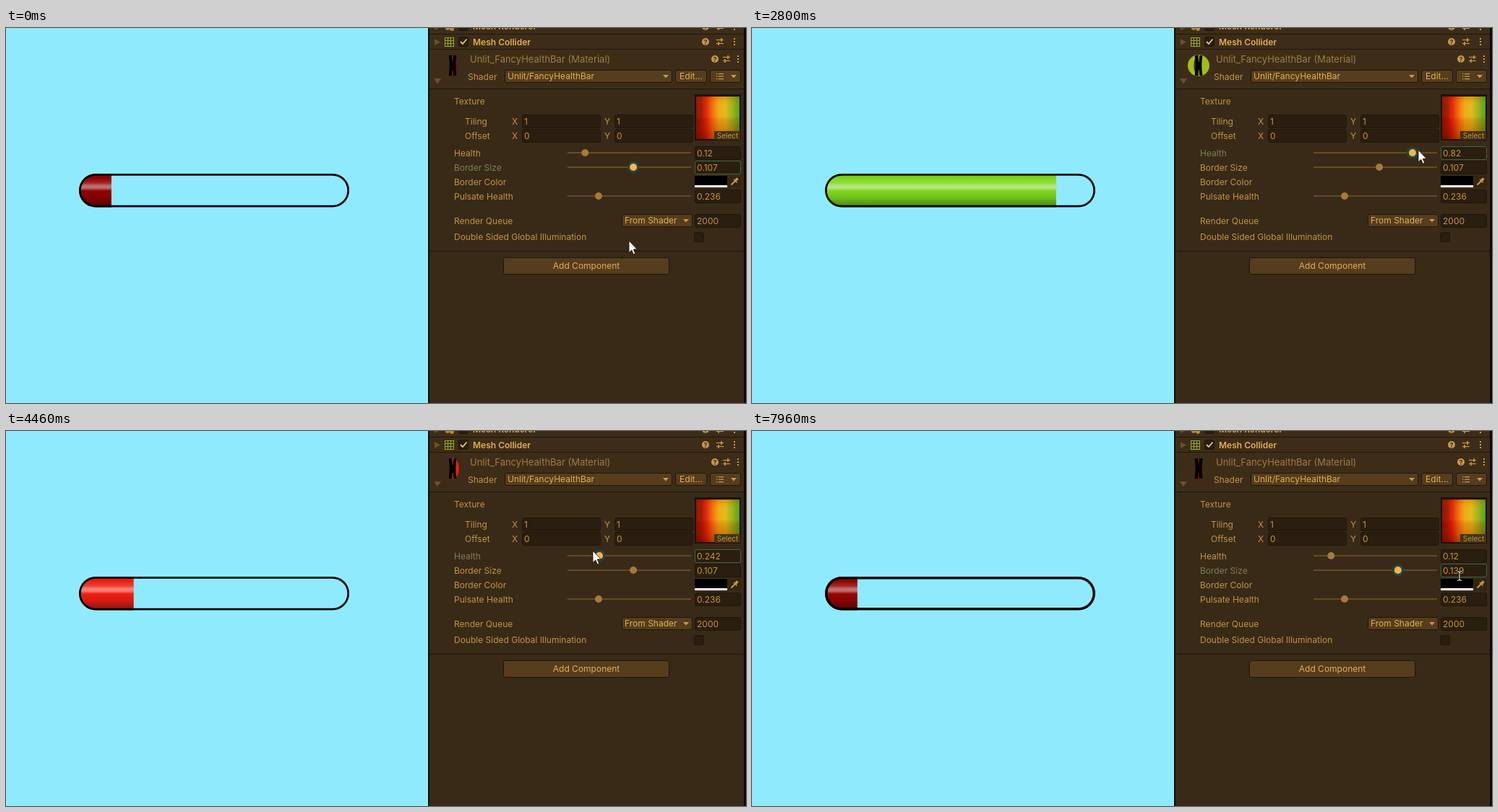
These frames come from a looping animation (1024 px wide and 520 px high, 8 s). An HTML page with a canvas:

```html
<!DOCTYPE html>
<html lang="en">
<head>
<meta charset="utf-8">
<title>Health bar inspector</title>
<style>
html, body { margin: 0; width: 100%; height: 100%; overflow: hidden; background: #90eafe; }
canvas { display: block; }
</style>
</head>
<body>
<canvas id="stage" width="1024" height="520"></canvas>
<script>
const g = document.getElementById('stage').getContext('2d');
const LOOP = 8000, STEP = 70, PAUSE_END = 3480, LAG = 20;
const HEALTH_FOCUS = 1120, BORDER_FOCUS = 5720;
const C = {
  sky: '#90eafe', panel: '#382a17', head: '#3d2d18', line: '#1e160b', field: '#2a1e10',
  button: '#553d1d', text: '#c39346', bright: '#e2ad54', dim: '#a07c40', faint: '#6b4f28', focus: '#7c8152'
};

// Pointer path: time, x, y
const path = [
  [70, 862, 295], [450, 832, 225], [840, 803, 171], [1050, 801.3, 170], [1400, 790, 170],
  [1680, 794, 170], [2240, 858, 171], [2310, 866, 171], [3150, 962, 168], [3480, 962, 168],
  [4390, 821, 166], [4460, 812, 166], [4700, 797, 168], [5000, 801.3, 169], [5150, 801.3, 169],
  [5580, 868.1, 189], [5720, 868.1, 189], [6420, 943, 189], [6770, 976, 188], [6950, 980, 188],
  [7400, 900, 189], [7540, 893.9, 189], [7650, 893.9, 189], [7960, 979, 201]
];
// Bar colour by health: position, r, g, b
const ramp = [
  [0, 125, 6, 6], [.12, 148, 4, 4], [.24, 255, 30, 12], [.35, 250, 110, 8],
  [.5, 232, 183, 0], [.7, 190, 205, 20], [1, 64, 224, 38]
];

const clamp = v => Math.max(0, Math.min(1, v));
const lerp = (a, b, k) => a + (b - a) * k;
const rgb = c => `rgb(${c.map(Math.round)})`;
const mix = (c, d, k) => c.map((v, i) => lerp(v, d[i], k));

function sample(keys, p) {
  if (p <= keys[0][0]) return keys[0].slice(1);
  const i = keys.findIndex(k => k[0] >= p);
  if (i < 0) return keys[keys.length - 1].slice(1);
  const a = keys[i - 1], b = keys[i];
  return mix(a.slice(1), b.slice(1), (p - a[0]) / (b[0] - a[0]));
}

const sliderAt = t => clamp((sample(path, t)[0] - 782) / 161);
const health = (t, lag) => t < HEALTH_FOCUS ? .12 : sliderAt(Math.min(t, 5150) - lag);
const border = (t, lag) => t < BORDER_FOCUS ? .107 : .2 * sliderAt(Math.min(t, 7650) - lag);

function rect(x, y, w, h, fill) {
  g.fillStyle = fill;
  g.fillRect(x, y, w, h);
}
function box(x, y, w, h, fill, edge = C.line) {
  g.beginPath();
  g.roundRect(x + .5, y + .5, w - 1, h - 1, 2.5);
  g.fillStyle = fill;
  g.fill();
  g.strokeStyle = edge;
  g.lineWidth = 1;
  g.stroke();
}
function text(s, x, y, color = C.text, size = 12, weight = 400, align = 'left') {
  g.font = `${weight} ${size}px Inter, sans-serif`;
  g.textAlign = align;
  g.fillStyle = color;
  g.fillText(s, x, y);
}
function disc(x, y, r, fill) {
  g.beginPath();
  g.arc(x, y, r, 0, 7);
  g.fillStyle = fill;
  g.fill();
}
function poly(points, fill) {
  g.beginPath();
  points.forEach(p => g.lineTo(...p));
  g.closePath();
  g.fillStyle = fill;
  g.fill();
}
function stroke(points, color, width) {
  g.beginPath();
  points.forEach(p => g.lineTo(...p));
  g.strokeStyle = color;
  g.lineWidth = width;
  g.stroke();
}
const caret = (x, y) => poly([[x - 4, y - 2], [x + 4, y - 2], [x, y + 2.5]], '#c79a50');

function headerIcons(x, y, gap) {
  disc(x, y, 5, '#c8994c');
  text('?', x, y + 3.5, C.head, 9, 700, 'center');
  const s = x + gap;
  stroke([[s - 5, y - 2.5], [s + 5, y - 2.5]], '#c8994c', 1.2);
  stroke([[s - 5, y + 2.5], [s + 5, y + 2.5]], '#c8994c', 1.2);
  stroke([[s + 2, y - 5], [s + 2, y]], '#c8994c', 1.6);
  stroke([[s - 2, y], [s - 2, y + 5]], '#c8994c', 1.6);
  for (const d of [-4, 0, 4]) rect(x + 2 * gap - 1, y + d - 1, 2, 2, '#c8994c');
}

function textureSwatch() {
  rect(953, 92, 64, 64, '#1b1309');
  const across = g.createLinearGradient(955, 0, 1015, 0);
  [[0, '#780400'], [.12, '#9c0500'], [.25, '#e31c04'], [.38, '#f0680a'], [.52, '#eda912'],
    [.68, '#dfba18'], [.82, '#96b41a'], [1, '#3fa016']].forEach(s => across.addColorStop(...s));
  rect(955, 95, 60, 59, across);
  const down = g.createLinearGradient(0, 95, 0, 154);
  [[0, 'rgba(190,60,0,.3)'], [.2, 'rgba(255,190,60,.12)'], [.45, 'rgba(255,190,60,.12)'],
    [.55, 'rgba(200,60,0,.2)'], [1, 'rgba(110,20,0,.5)']].forEach(s => down.addColorStop(...s));
  rect(955, 95, 60, 59, down);
  rect(980, 143, 36, 12, '#453218');
  text('Select', 998.5, 153, C.text, 10, 400, 'center');
}

function panel() {
  rect(584, 0, 440, 520, C.panel);
  rect(584, 0, 2, 520, '#120d06');
  rect(586, 0, 435, 84, C.head);
  for (const y of [8, 29, 84, 309]) rect(586, y, 435, 1, C.line);
  rect(1021, 0, 3, 520, '#0e0a05');

  text('Mesh Renderer', 646, 2, C.bright, 12, 600);
  headerIcons(968, -2, 20);
  disc(611, 0, 3, '#a98a3c');
  disc(617, 1, 3, '#b98c30');
  box(626, -9, 14, 13, C.field);
  poly([[593, -6], [593, 3], [601, -1]], C.faint);

  poly([[593, 15], [593, 24], [601, 19.5]], C.faint);
  g.strokeStyle = '#93ae20';
  g.lineWidth = 1;
  for (let i = 0; i < 4; i++) {
    const d = i * 4 + .5;
    stroke([[607 + d, 13], [607 + d, 26]], '#93ae20', 1);
    stroke([[607, 13 + d], [620, 13 + d]], '#93ae20', 1);
  }
  box(626, 12, 14, 14, C.field);
  stroke([[629, 19], [632, 22], [637.5, 15.5]], '#f0c47a', 1.8);
  text('Mesh Collider', 646, 24, C.bright, 12, 600);
  headerIcons(968, 19, 20);

  text('Unlit_FancyHealthBar (Material)', 642, 48, C.dim, 13);
  headerIcons(981, 43, 16);
  poly([[592, 70], [602, 70], [597, 77.5]], C.faint);
  text('Shader', 639, 72);
  box(690, 58, 232, 18, C.button);
  text('Unlit/FancyHealthBar', 694, 71, C.bright);
  caret(913, 67);
  box(926, 58, 44, 18, C.button);
  text('Edit...', 948, 71, C.bright, 12, 400, 'center');
  box(974, 58, 43, 18, C.button);
  for (const y of [63, 66.5, 70]) {
    rect(983, y, 1.5, 1.2, '#c79a50');
    rect(986, y, 7, 1.2, '#c79a50');
  }
  caret(1007, 67);

  text('Texture', 620, 106);
  [['Tiling', 1, 120], ['Offset', 0, 140]].forEach(([label, value, y]) => {
    text(label, 635, y + 14);
    text('X', 700, y + 14);
    text('Y', 828, y + 14);
    for (const x of [714, 842]) {
      box(x, y, 109, 19, C.field);
      text(value, x + 3, y + 14);
    }
  });
  textureSwatch();

  text('Border Color', 620, 218);
  rect(953, 205, 45, 13, '#000');
  rect(953, 218, 45, 3, '#fff');
  box(1000, 205, 17, 16, '#332512', '#332512');
  stroke([[1003.5, 217.5], [1009, 212]], '#c8994c', 2);
  stroke([[1007, 210], [1011.5, 214.5]], '#c8994c', 1.6);
  stroke([[1009.5, 211.5], [1012.5, 208.5]], '#c8994c', 3.4);

  text('Render Queue', 620, 272);
  box(852, 258, 98, 18, C.button);
  text('From Shader', 856, 271, C.bright);
  caret(941, 267);
  box(953, 258, 64, 19, C.field);
  text('2000', 956, 272);
  text('Double Sided Global Illumination', 620, 294);
  box(952, 283, 14, 14, C.field);
  box(688, 318, 230, 24, C.button);
  text('Add Component', 803, 334, C.bright, 12, 400, 'center');
}

function slider(label, value, max, y, active) {
  text(label, 620, y + 5, active ? C.focus : C.text);
  rect(777, y - 1, 171, 2, '#664a23');
  const x = 782 + 161 * value / max;
  if (active) disc(x, y, 8, '#24463c');
  disc(x, y, 5, active ? '#f2b355' : '#a57a3b');
  box(953, y - 9, 64, 19, C.field, active ? '#3b6444' : C.line);
  text(String(+value.toFixed(3)), 956, y + 5);
}

function barColor(h, t) {
  const c = sample(ramp, h);
  if (h >= .236) return c;
  const pulse = Math.cos((t - 1700) / 1320 * 2 * Math.PI);
  return c.map((v, i) => Math.max(0, v + pulse * (i ? 10 : 20)));
}

function healthBar(h, width, color) {
  const shade = g.createLinearGradient(0, 202, 0, 248);
  const glow = mix(color, [255, 255, 255], .42), dark = mix(color, [0, 0, 0], .4);
  [[0, mix(color, dark, .3)], [.14, color], [.28, mix(color, glow, .35)], [.36, glow], [.43, glow],
    [.52, color], [.72, mix(color, dark, .25)], [1, dark]].forEach(([p, c]) => shade.addColorStop(p, rgb(c)));
  g.save();
  g.beginPath();
  g.roundRect(101, 202, 374, 46.5, 23.2);
  g.clip();
  rect(101, 202, 374 * h, 47, shade);
  g.restore();
  g.beginPath();
  g.roundRect(101 + width / 2, 202 + width / 2, 374 - width, 46.5 - width, 23.2 - width / 2);
  g.strokeStyle = '#000';
  g.lineWidth = width;
  g.stroke();
}

// Material preview: the bar wraps twice around a sphere
function preview(h, size, color) {
  const x = 618, y = 52, r = 15, edge = r * Math.sin(h * Math.PI);
  g.fillStyle = rgb(mix(color, [255, 120, 20], h < .236 ? 0 : .28));
  g.beginPath();
  g.ellipse(x, y, h < .5 ? edge : r, r, 0, -Math.PI / 2, Math.PI / 2);
  g.fill();
  if (h > .5) {
    g.beginPath();
    g.arc(x, y, r, Math.PI / 2, Math.PI * 1.5);
    g.ellipse(x, y, edge, r, 0, Math.PI * 1.5, Math.PI / 2, true);
    g.fill();
  }
  g.strokeStyle = '#000';
  g.lineWidth = 2.6 + size * 13;
  for (const side of [-1, 1]) {
    g.beginPath();
    g.moveTo(x + side * 3.4, y - 14);
    g.quadraticCurveTo(x + side * 1.2, y, x + side * 3.4, y + 14);
    g.stroke();
  }
  rect(x - 3, y - 5, 6, 11, '#000');
}

function pointer(x, y, overField) {
  if (overField) {
    g.lineCap = 'butt';
    const beam = [[[-3, -6.5], [0, -5.5], [3, -6.5]], [[0, -6], [0, 6]], [[-3, 6.5], [0, 5.5], [3, 6.5]]];
    for (const [color, width] of [['#000', 2.6], ['#fff', 1.1]])
      beam.forEach(line => stroke(line.map(p => [x + p[0], y + p[1]]), color, width));
    return;
  }
  const shape = [[0, 0], [0, 16.5], [3.8, 13], [6.3, 19], [8.8, 17.9], [6.3, 12], [11.3, 11.8]];
  poly(shape.map(p => [x + p[0], y + p[1]]), '#fff');
  g.strokeStyle = '#1a120a';
  g.lineWidth = .9;
  g.stroke();
}

function draw(now) {
  const time = now % LOOP, start = time < PAUSE_END ? 0 : PAUSE_END;
  const t = start + Math.floor((time - start) / STEP) * STEP;
  const h = health(t, LAG), b = border(t, LAG), color = barColor(h, t);
  rect(0, 0, 1024, 520, C.sky);
  healthBar(h, b * 25, color);
  panel();
  preview(h, b, color);
  slider('Health', health(t, STEP), 1, 173, t >= HEALTH_FOCUS && t < BORDER_FOCUS);
  slider('Border Size', border(t, STEP), .2, 193, t < HEALTH_FOCUS || t >= BORDER_FOCUS);
  slider('Pulsate Health', .236, 1, 233, false);
  const [x, y] = sample(path, t);
  pointer(x, y, t > 7650 && x > 953);
}

const begin = performance.now();
function tick() {
  draw(performance.now() - begin);
  requestAnimationFrame(tick);
}
tick();
</script>
</body>
</html>
```
